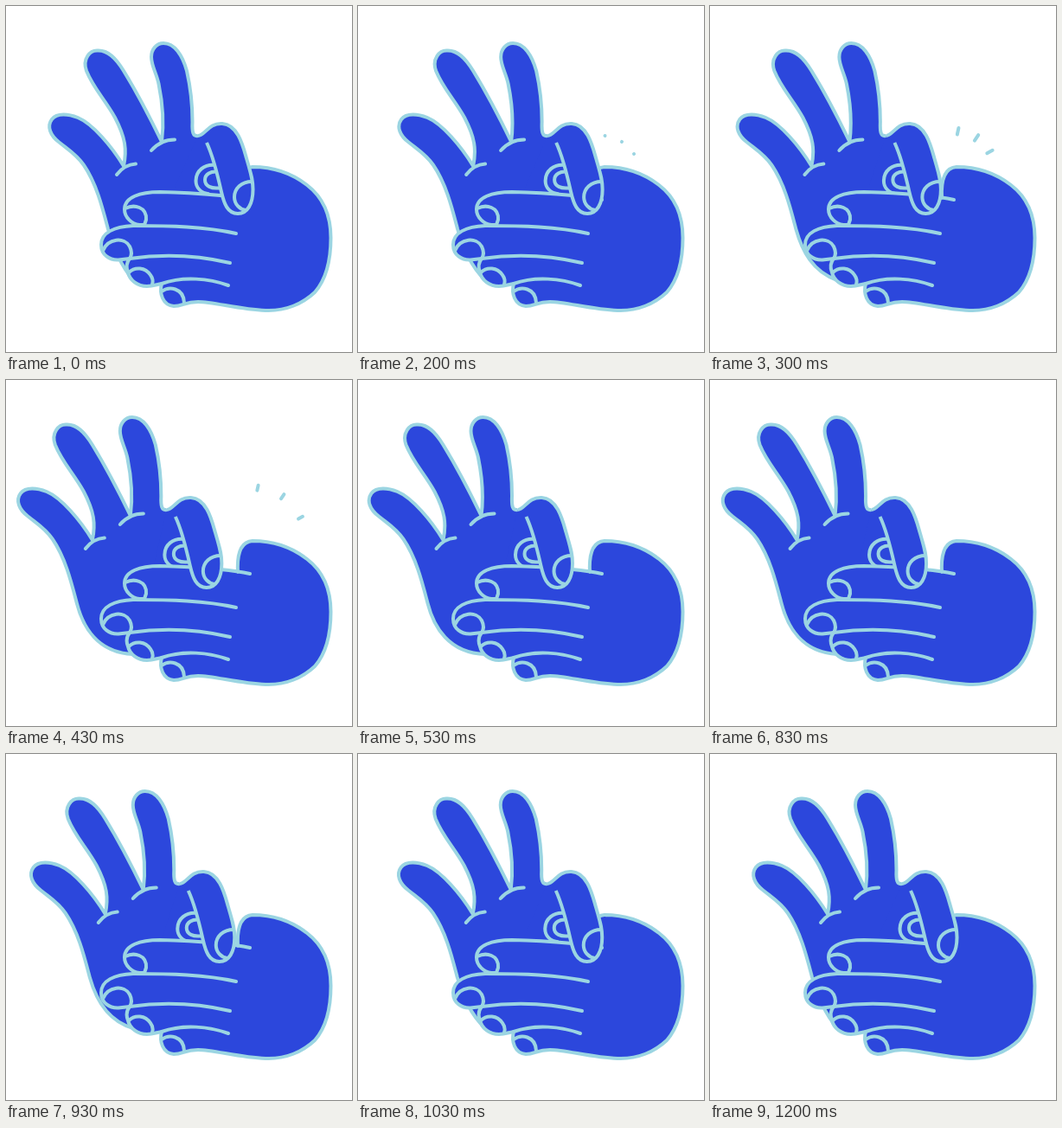
An HTML page that plays this animation: 400 px wide and 400 px high, repeating every 1410 ms.

```html
<!DOCTYPE html>
<html lang="en">
<head>
<meta charset="utf-8">
<title>Hands</title>
<style>
  html, body { margin: 0; width: 100%; height: 100%; overflow: hidden; background: #fff; }
  svg { display: block; width: 100%; height: 100%; }
  path, line { fill: none; stroke: #9bd5e2; stroke-width: 4; stroke-linejoin: round; }
  .skin { fill: #2c47dc; }
  .flat { stroke: none; }
  .round { stroke-linecap: round; }
</style>
</head>
<body>
<svg viewBox="0 0 400 400">
  <g id="sparks" class="round"></g>

  <!-- back hand: palm, three fingers, thumb tip -->
  <g class="slide">
    <path class="skin flat" d="M190 160 L210 145 L222 150 L236 150 L252 225 L150 240 Z"/>
    <path id="palm" class="skin"/>
    <g class="round">
      <path d="M128 195 C134 187 141 183 150 182.5"/>
      <path d="M168 167 C175 159 184 154.5 195 154.5"/>
    </g>
    <path d="M243 184 C229 182 219.5 191 219.5 202 C219.5 210 225 216 235 217.5"/>
    <path d="M247 192 C236 190 230 195 230 201 C230 208 237 212 249 210"/>
  </g>

  <!-- front hand -->
  <g class="round">
    <path class="skin" d="M282 224 C268 221 258 220 248 219 C225 217 200 215.5 178 215
      C155 215 137 221 137 235 C137 245 146 252 154 253 L147 254
      C125 255 110 262 110 276 C110 288 120 294 130 293.5 L143 292
      C139 297 139 303 141 308 C143 317 152 324 163 324 C170 324 174 322 180 321
      C177 332 181 346 194 347 C205 347 206 342 222 342
      C240 342 270 351 300 352 C323 353 343 344 357 331 C371 315 375.5 292 375.5 268
      C375.5 240 365 220 348 207 C330 193 307 186 285 186 C270 187 267 203 268 222"/>
    <path d="M266 263 C230 255 190 254 147 254"/>
    <path d="M259 297 C225 289 185 286 143 292"/>
    <path d="M257 323 C235 315 205 312 180 321"/>
    <path d="M138 234 C148 229 163 232 162 247 L160 253 L154 253"/>
    <path d="M112 283 C118 268 137 267 143 278 C146.5 285 145 289 143 292"/>
    <path d="M142 308 C149 301 161 302 167 311 C170 315 170 319 169 322"/>
    <path d="M180 330 C188 324 205 325 206 343"/>
  </g>

  <!-- pinching finger of the back hand -->
  <g class="slide">
    <path class="skin" d="M222 150 C230 150 234 135 250 136 C268 137 274 162 278 176
      C283 194 285.5 200 285.5 212 C285.5 229 279 240 268 240
      C256 240 252 228 249 215 C245 197 240 175 232 158"/>
    <path d="M284.5 203 C272 203 264 211 264 221 C264 229 270 235 277 236"/>
  </g>
</svg>
<script>
  const LOOP = 1410, SHIFT = -37.5;
  const FINGERS = `C112 235 105 206 90 184 C82 172 72 166 62 158 C51 150 47 139 53 131
    C59 123 73 125 83 129 C100 136 122 162 136 185
    C140 166 138 152 126 129 C115 109 101 95 93 75 C88 61 97 51 106 51.5
    C118 51 127 60 136 75 C152 101 167 130 180 157
    C182.5 138 181 112 176.5 90 C174 78 168 69 168 59 C168 50 174 43 182 43
    C195 43 204 57 209 75 C214 97 215.5 118 215.5 134 C215 146 216 151 222 150`;
  const RAYS = [[285.5, 150, 292, 120], [305, 157, 322.5, 130.5], [319, 171, 344.5, 157]];

  const palm = document.getElementById('palm');
  const sparks = document.getElementById('sparks');
  const slides = document.querySelectorAll('.slide');
  const lines = RAYS.map(() =>
    sparks.appendChild(document.createElementNS('http://www.w3.org/2000/svg', 'line')));

  const span = (t, a, b) => Math.min(1, Math.max(0, (t - a) / (b - a)));
  const quart = p => p < .5 ? 8 * p ** 4 : 1 - 8 * (1 - p) ** 4;
  const sine = p => (1 - Math.cos(Math.PI * p)) / 2;

  function draw(t) {
    const dx = SHIFT * (quart(span(t, 33, 570)) - quart(span(t, 683, 1197)));
    slides.forEach(g => g.setAttribute('transform', `translate(${dx} 0)`));
    // the wrist end of the palm stays put while the rest slides
    palm.setAttribute('d', `M${147 - dx} 317
      C${132 - .28 * dx} ${299 - .45 * dx} 125 ${280 - .15 * dx} 118 258 ${FINGERS}`);

    sparks.style.display = t >= 190 && t < 515 ? '' : 'none';
    const tip = sine(span(t, 200, 475)), tail = sine(span(t, 265, 515));
    RAYS.forEach(([x1, y1, x2, y2], i) => {
      const set = (n, p) => {
        lines[i].setAttribute('x' + n, x1 + (x2 - x1) * p);
        lines[i].setAttribute('y' + n, y1 + (y2 - y1) * p);
      };
      set(1, tail);
      set(2, tip + .001);
    });
  }

  const start = performance.now();
  function tick() {
    draw((performance.now() - start) % LOOP);
    requestAnimationFrame(tick);
  }
  tick();
</script>
</body>
</html>
```
